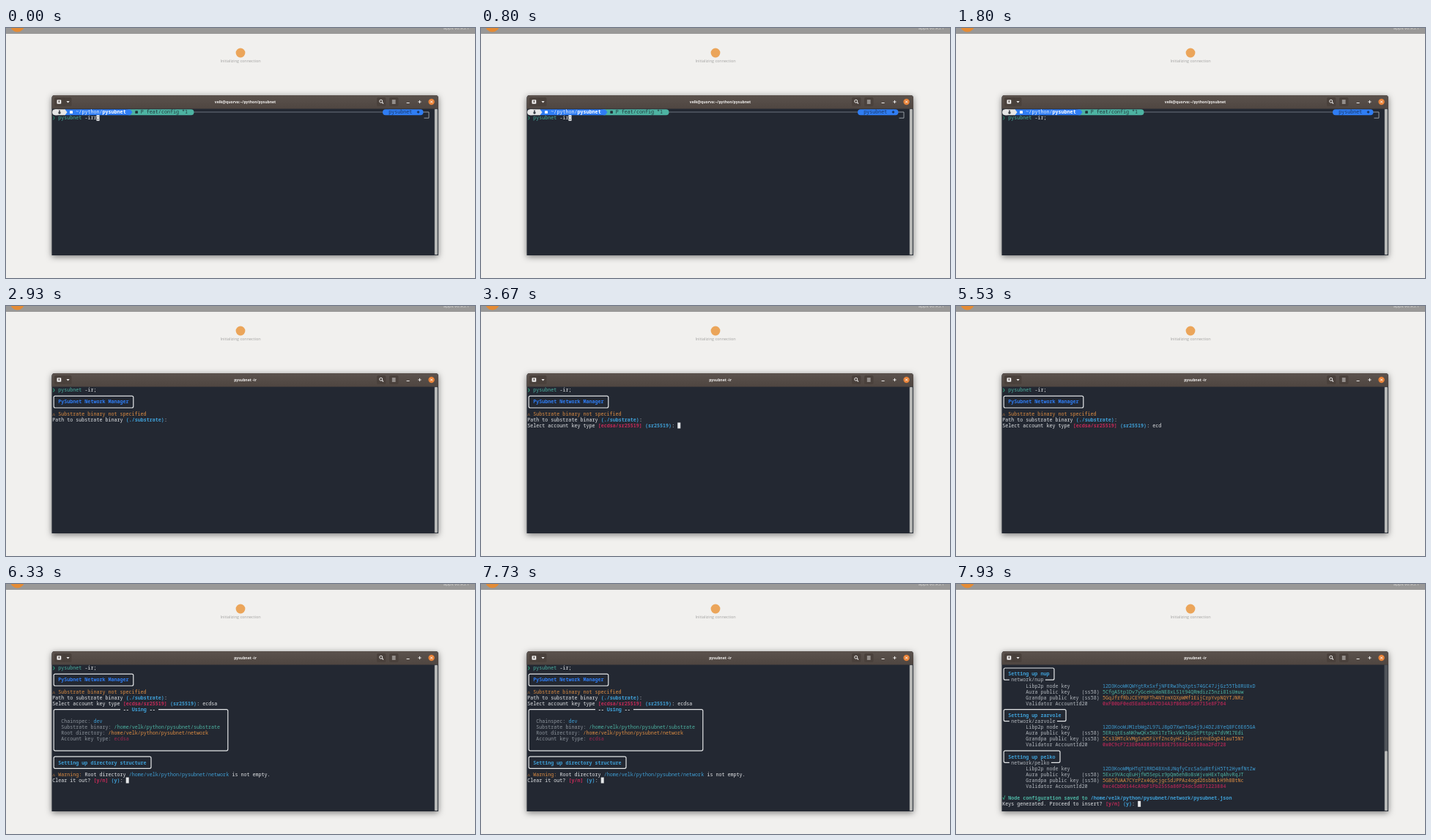
An HTML page with a canvas for the animation above (8 s loop, 640 px wide and 342 px high).

```html
<!DOCTYPE html>
<html lang="en">
<head>
<meta charset="utf-8">
<title>Terminal session</title>
<style>
  html, body { margin: 0; width: 100%; height: 100%; overflow: hidden; background: #f1f0ee; }
  canvas { display: block; width: 100vw; height: 100vh; }
</style>
</head>
<body>
<canvas id="stage" width="640" height="342"></canvas>
<script>
const ctx = document.getElementById('stage').getContext('2d');
const LOOP = 8000;
const LEFT = 63.2, TOP = 115, COL = 4.02, ROW = 8.08;
const MONO = '"Noto Sans Mono", "DejaVu Sans Mono", monospace';
const SANS = '"Open Sans", "Noto Sans", sans-serif';
const C = {
  bg: '#232832', white: '#e4e6e8', grey: '#8d949c', teal: '#4db3a2', blue: '#2f7df4',
  sky: '#3f9fd6', orange: '#de8d42', red: '#c52a58', dim: '#9e2750', green: '#38b48b'
};
const HOME = '/home/velk/python/pysubnet';

// Times at which the session moves on
const AT = { erase: 450, enter: 1750, run: 1870, path: 2200, key: 3300, type: 4900, using: 6200, nodes: 7800, done: 7870 };

const NODES = [
  ['nup', '12D3KooWKQWYgtRxSxfjNFERw3hqXpts74GC47JjGz55Tb8RU8xD',
    '5CfgAStp1Dv7yGceHiWaNE8xLS1t94QRmdizZ5nzi81sUmuw',
    '5GqJfrfRbJCEYPBFTh4NTrmXQXpWMf1EijCrpYvpNQYTJNRz',
    '0xFB0bF0ed5Ea8b46A7D34A3fB68bF5d9715e8F764'],
  ['zarvole', '12D3KooWJM1rbWgZL97LJ8pD7XwnTGa4j9J4DZJ8YeQ8FC6E65GA',
    '5ERrqtEsaNKhwQKx5WX1TrTksVkk5pcDtPttpy47dVM17Edi',
    '5Cs33MTckVMgSzW5FiYfZnc6yHCJjkzietVnEDqD41auT5N7',
    '0x0C9cF723E06A883991B5E75588bC6510aa2Fd728'],
  ['pelko', '12D3KooWMpHTqT1RRD4BXn8JNqfyCrcSaSuBtfiH5Tt2HymfNtZw',
    '5Exz9VAcqEuHjfW5SepLr9pQm6ehBoBsWjvaHExTqAhvRqJT',
    '5GBCfUAA7CYrPZx4GpcjgcSdJPPAz4ogd26sbBLkH9hBBtNc',
    '0xc4CbD6144cA9bF1Fb2555a86F24dc5dB71223884']
];

const colX = col => LEFT + col * COL;
const rowY = row => TOP + row * ROW;

function label(text, x, y, size, color, { bold = false, font = SANS, align = 'left' } = {}) {
  ctx.font = `${bold ? 'bold ' : ''}${size}px ${font}`;
  ctx.textAlign = align;
  ctx.fillStyle = color;
  ctx.fillText(text, x, y);
}

// Each part is [text, color, bold]; returns the column after the last one.
function write(row, col, ...parts) {
  for (const [text, color = C.white, bold] of parts) {
    label(text, colX(col), rowY(row) + 2.3, 6.7, color, { bold, font: MONO });
    col += text.length;
  }
  return col;
}

function rect(x, y, w, h, color, radius = 0) {
  ctx.fillStyle = color;
  ctx.beginPath();
  ctx.roundRect(x, y, w, h, radius);
  ctx.fill();
}

function circle(x, y, r, color) {
  ctx.fillStyle = color;
  ctx.beginPath();
  ctx.arc(x, y, r, 0, 7);
  ctx.fill();
}

function line(color, width, ...points) {
  ctx.strokeStyle = color;
  ctx.lineWidth = width;
  ctx.beginPath();
  points.forEach(([x, y]) => ctx.lineTo(x, y));
  ctx.stroke();
}

function frame(firstRow, lastRow, right) {
  ctx.strokeStyle = C.white;
  ctx.lineWidth = 1.2;
  ctx.beginPath();
  ctx.roundRect(65.2, rowY(firstRow), right - 65.2, (lastRow - firstRow) * ROW, 2);
  ctx.stroke();
}

function gap(row, from, to) {
  rect(from, rowY(row) - 3, to - from, 6, C.bg);
}

function cursor(row, col, since, t, char) {
  if ((t - since) % 1200 >= 600) return;
  rect(colX(col), rowY(row) - 4, COL, 8, C.white);
  if (char) write(row, col, [char, C.bg]);
}

function drawPage() {
  rect(0, 0, 640, 342, '#f1f0ee');
  rect(0, 0, 640, 8, '#999897');
  circle(15.5, -4, 9.5, '#e48b35');
  label('apps v0.93.1', 632, 1.5, 6, '#dedddc', { align: 'right' });
  circle(320, 34, 6.4, '#eba55a');
  label('Initializing connection', 320, 47, 5.45, '#a3a2a1', { align: 'center' });
}

function drawWindow(title, scrolled) {
  ctx.save();
  ctx.shadowColor = 'rgba(0,0,0,.5)';
  ctx.shadowBlur = 8;
  ctx.shadowOffsetY = 2;
  rect(62.5, 92, 527.5, 219, C.bg, [4, 4, 0, 0]);
  ctx.restore();
  const bar = ctx.createLinearGradient(0, 92, 0, 110);
  bar.addColorStop(0, '#5b524d');
  bar.addColorStop(1, '#4f4641');
  rect(62.5, 92, 527.5, 18.5, bar, [4, 4, 0, 0]);
  label(title, 326.5, 102.9, 5.1, '#f1efed', { bold: true, align: 'center' });

  rect(66, 95, 23.5, 12, '#4a413c', 2);
  rect(69.5, 98.2, 5.8, 5.6, '#eeeceb', 0.7);
  rect(71.7, 99.2, 1.4, 2.8, '#4a413c');
  line('#4a413c', 0.7, [79, 95], [79, 107]);
  ctx.fillStyle = '#eeeceb';
  ctx.beginPath();
  ctx.moveTo(82.5, 100);
  ctx.lineTo(86.7, 100);
  ctx.lineTo(84.6, 102.4);
  ctx.fill();

  rect(506, 95, 12.5, 12, '#4a413c', 2);
  rect(523, 95, 12.5, 12, '#4a413c', 2);
  ctx.strokeStyle = '#eeeceb';
  ctx.lineWidth = 1;
  ctx.beginPath();
  ctx.arc(511.7, 100.2, 2, 0, 7);
  ctx.stroke();
  line('#eeeceb', 1.1, [513.2, 101.7], [515, 103.5]);
  for (const y of [99, 101, 103]) line('#eeeceb', 0.9, [526.8, y], [531.6, y]);
  line('#eeeceb', 1, [546.6, 102.5], [550.6, 102.5]);
  line('#eeeceb', 1, [562.4, 101], [566.6, 101]);
  line('#eeeceb', 1, [564.5, 98.9], [564.5, 103.1]);
  circle(580.6, 101, 4.2, '#e88136');
  line('#fff', 0.9, [579, 99.4], [582.2, 102.6]);
  line('#fff', 0.9, [582.2, 99.4], [579, 102.6]);

  rect(584.5, 110.5, 5, 200, '#50545a');
  const thumbTop = scrolled ? 228.5 : 111;
  rect(585, thumbTop, 3.8, 310 - thumbTop, '#b9bab8', 1);
}

function segment(x, right, color) {
  ctx.fillStyle = color;
  ctx.beginPath();
  ctx.moveTo(x, 111.2);
  ctx.lineTo(right - 3, 111.2);
  ctx.lineTo(right, 115.2);
  ctx.lineTo(right - 3, 119.2);
  ctx.lineTo(x, 119.2);
  ctx.fill();
}

function drawPrompt(t) {
  line('#737c86', 0.9, [256, 115], [515, 115]);
  line('#a3a9af', 0.9, [569, 115], [577, 115], [577, 123.2], [570.5, 123.2]);
  rect(164, 111.2, 92.5, 8, C.teal, 4);
  segment(80, 172.5, C.blue);
  rect(63.2, 111.2, 10, 8, '#e6e6e6', 4);
  segment(67, 83.5, '#e6e6e6');
  circle(73, 116, 1.7, '#343a43');
  circle(73, 113.6, 1, '#343a43');
  rect(87, 113.3, 4, 3.8, '#fff', 0.5);
  write(0, 8, ['~/python/', '#f1f5fa'], ['pysubnet', '#fff', true]);
  rect(176.3, 113.3, 3.6, 3.8, '#22343a', 0.5);
  write(0, 30, ['P feat/config *1', '#22343a']);
  rect(514, 111.2, 55.5, 8, C.blue, 4);
  write(0, 114.2, ['pysubnet ◆', '#19345f']);

  write(1, 0, ['❯', '#278d70']);
  const erased = t >= AT.erase;
  const end = write(1, 2, ['pysubnet', C.teal], [erased ? ' -ir' : ' -irr']);
  write(1, end, [';']);
  if (t < AT.enter) cursor(1, end, erased ? AT.erase : 0, t, ';');
}

function drawSetup(t) {
  write(0, 0, ['❯ ', C.green], ['pysubnet', C.teal], [' -ir;']);
  if (t < AT.path) return;

  frame(1, 3, 173.8);
  write(2, 2, ['PySubnet Network Manager', C.blue, true]);
  write(4, 0, ['⚠', C.orange]);
  write(4, 2, ['Substrate binary not specified', C.orange]);
  let end = write(5, 0, ['Path to substrate binary '], ['(./substrate)', C.sky, true], [': ']);
  if (t < AT.key) return cursor(5, end, 2000, t);

  const typed = 'ecdsa'.slice(0, Math.max(0, Math.floor((t - AT.type) / 160)));
  end = write(6, 0, ['Select account key type '], ['[ecdsa/sr25519]', C.red, true], [' '],
    ['(sr25519)', C.sky, true], [': '], [typed]);
  if (t < AT.using) return cursor(6, end, typed ? AT.type : AT.key, t);

  frame(7, 14, 302.8);
  gap(7, 156, 208);
  write(7, 24, ['-- ', C.white, true], ['Using', C.sky, true], [' --', C.white, true]);
  write(9, 3, ['Chainspec: ', C.grey], ['dev', C.sky]);
  write(10, 3, ['Substrate binary: ', C.grey], [HOME + '/substrate', C.teal]);
  write(11, 3, ['Root directory: ', C.grey], [HOME + '/network', C.orange]);
  write(12, 3, ['Account key type: ', C.grey], ['ecdsa', C.dim]);

  frame(15, 17, 198);
  write(16, 2, ['Setting up directory structure', C.sky, true]);
  write(18, 0, ['⚠', C.orange]);
  write(18, 2, ['Warning:', C.orange], [' Root directory '], [HOME + '/network', C.sky], [' is not empty.']);
  end = write(19, 0, ['Clear it out? '], ['[y/n]', C.red, true], [' '], ['(y)', C.sky, true], [': ']);
  cursor(19, end, AT.using, t);
}

function drawNode([name, nodeKey, aura, grandpa, validator], row) {
  frame(row, row + 2, colX(14.6 + name.length));
  write(row + 1, 2, ['Setting up ' + name, C.sky, true]);
  gap(row + 2, colX(2.4), colX(11.6 + name.length));
  write(row + 2, 3, ['network/' + name, '#b3b8be']);
  const keys = [
    ['Libp2p node key', nodeKey, C.sky],
    ['Aura public key    (ss58)', aura, C.teal],
    ['Grandpa public key (ss58)', grandpa, C.orange],
    ['Validator AccountId20', validator, C.dim]
  ];
  keys.forEach(([caption, key, color], i) => {
    write(row + 3 + i, 8, [caption, '#b3b8be']);
    write(row + 3 + i, 34, [key, color, color === C.dim]);
  });
}

function drawNodes(t) {
  const done = t >= AT.done;
  NODES.slice(0, done ? 3 : 2).forEach((node, i) => drawNode(node, i * 7));
  if (!done) return;
  write(22, 0, ['√ ', C.green, true], ['Node configuration saved to ', C.teal, true],
    [HOME + '/network/pysubnet.json', C.sky, true]);
  const end = write(23, 0, ['Keys generated. Proceed to insert? '], ['[y/n]', C.red, true], [' '],
    ['(y)', C.sky, true], [': ']);
  cursor(23, end, AT.done, t);
}

function draw() {
  const t = performance.now() % LOOP;
  const running = t >= AT.run;
  drawPage();
  drawWindow(running ? 'pysubnet -ir' : 'velk@quorva:~/python/pysubnet', t >= AT.nodes);
  if (!running) drawPrompt(t);
  else if (t < AT.nodes) drawSetup(t);
  else drawNodes(t);
  requestAnimationFrame(draw);
}
draw();
</script>
</body>
</html>
```
